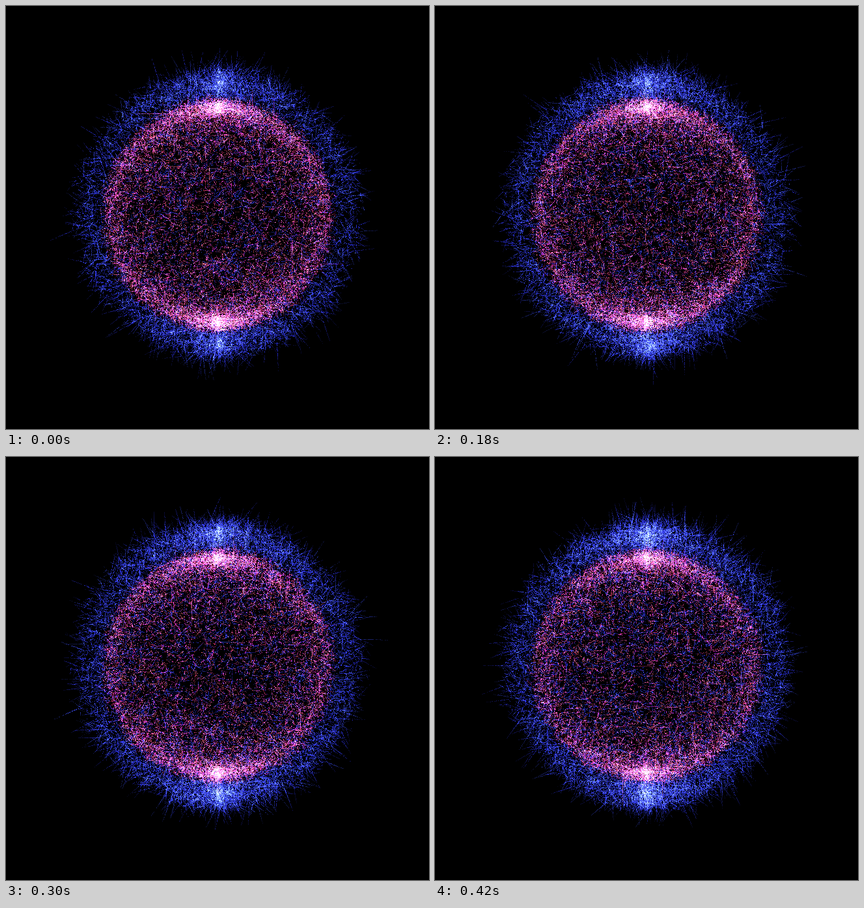
These frames come from a looping animation (650x650 px, 0.45 s). An HTML page with a canvas:

```html
<!DOCTYPE html>
<html lang="en">
<head>
<meta charset="utf-8">
<title>Particle sphere</title>
<style>
  html, body { margin: 0; width: 100%; height: 100%; overflow: hidden; background: #000; }
  canvas { display: block; width: 650px; height: 650px; }
</style>
</head>
<body>
<canvas id="stage" width="650" height="650"></canvas>
<script>
const SIZE = 650, STEP = 30, STEPS = 15, TILT = 0.24;
const ctx = document.getElementById('stage').getContext('2d');
const image = ctx.createImageData(SIZE, SIZE);
const px = image.data;

const PINK = [[240, 50, 220], [240, 100, 115], [245, 95, 180], [220, 55, 115]];
const BLUE = [[44, 50, 240], [62, 82, 255], [50, 56, 250]];

function seeded(seed) {
  let a = seed * 7919 + 17;
  return () => {
    a = (a + 0x6D2B79F5) | 0;
    let t = Math.imul(a ^ (a >>> 15), 1 | a);
    t = (t + Math.imul(t ^ (t >>> 7), 61 | t)) ^ t;
    return ((t ^ (t >>> 14)) >>> 0) / 4294967296;
  };
}

function addDot(x, y, color, gain) {
  const k = ((y | 0) * SIZE + (x | 0)) * 4;
  for (let c = 0; c < 3; c++) px[k + c] += color[c] * gain;
}

// A streak fades towards its tip; loose streaks break up into dots.
function streak(rnd, x, y, dx, dy, color, gain, keep) {
  const n = Math.max(1, Math.round(Math.max(Math.abs(dx), Math.abs(dy))));
  for (let i = 0; i < n; i++) {
    const t = i / n;
    if (rnd() < keep) addDot(x + dx * t, y + dy * t, color, gain * (1 - 0.75 * t));
  }
}

// Even steps in latitude and longitude crowd the streaks at both tilted poles.
function shell(rnd, s) {
  for (let i = 0; i < s.count; i++) {
    const lat = rnd() * Math.PI, lon = rnd() * 2 * Math.PI;
    const r = s.radius + (rnd() + rnd() - 1) * s.spread;
    const nx = Math.sin(lat) * Math.cos(lon);
    const ny = Math.cos(lat) * Math.cos(TILT) + Math.sin(lat) * Math.sin(lon) * Math.sin(TILT);
    const x = s.x + r * nx, y = s.y + r * ny;
    const color = s.colors[rnd() * s.colors.length | 0];
    const gain = 0.45 + 0.6 * rnd();

    if (rnd() < s.straight) {
      const len = (15 + 25 * rnd()) * (rnd() < 0.5 ? -1 : 1);
      const flat = rnd() < 0.5;
      streak(rnd, x, y, flat ? len : 0, flat ? 0 : len, color, gain * 0.8, 0.95);
      continue;
    }
    const uy = 2 * rnd() - 1, turn = rnd() * 2 * Math.PI;
    const ux = Math.sqrt(1 - uy * uy) * Math.cos(turn);
    const len = Math.min(s.maxLen, 2 - s.len * Math.log(1 - rnd()));
    streak(rnd, x, y, (ux + nx * s.outward) * len, (uy + ny * s.outward) * len,
      color, gain, s.keep);
  }
}

function draw(step) {
  const p = step / (STEPS - 1), rnd = seeded(step + 1);
  for (let i = 0; i < px.length; i += 4) {
    px[i] = px[i + 1] = px[i + 2] = 0;
    px[i + 3] = 255;
  }
  shell(rnd, {
    x: 327, y: 319, radius: 204, spread: 25, count: 10500 + 3500 * p, colors: BLUE,
    len: 11, maxLen: 32, outward: 0.45, straight: 0.007, keep: 0.66
  });
  shell(rnd, {
    x: 325.5, y: 321, radius: 170, spread: 14, count: 17500 - 3000 * p, colors: PINK,
    len: 5, maxLen: 28, outward: 0, straight: 0.004, keep: 0.62
  });
  ctx.putImageData(image, 0, 0);
}

let shown = -1;
function tick() {
  const step = Math.floor(performance.now() / STEP) % STEPS;
  if (step !== shown) draw(shown = step);
  requestAnimationFrame(tick);
}
tick();
</script>
</body>
</html>
```
